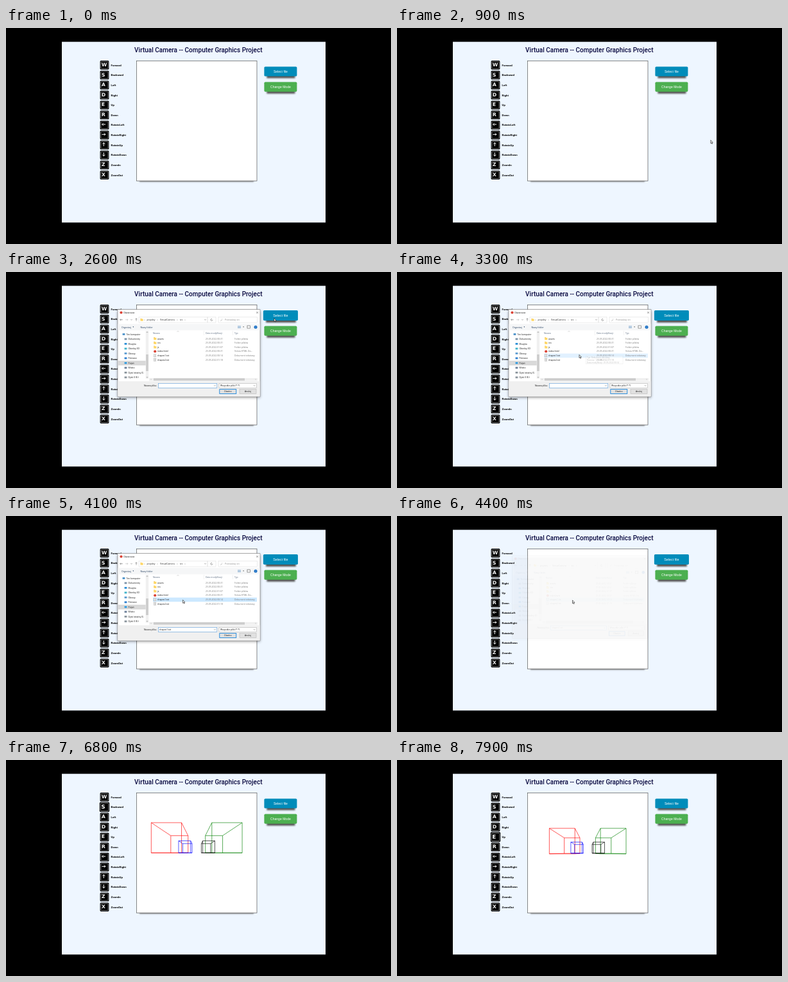
Recreate the animation shown at these times as an HTML page with a canvas. Size 600x338 px, loop 8000 ms.

```html
<!DOCTYPE html>
<html lang="en">
<head>
<meta charset="utf-8">
<title>Virtual Camera</title>
<style>
html, body { margin: 0; width: 100%; height: 100%; overflow: hidden; background: #000; }
canvas { display: block; width: 600px; height: 338px; }
</style>
</head>
<body>
<canvas id="stage"></canvas>
<script>
const LOOP = 8000, STEP = 100;
const canvas = document.getElementById('stage');
const dpr = window.devicePixelRatio || 1;
canvas.width = 600 * dpr;
canvas.height = 338 * dpr;
const ctx = canvas.getContext('2d');

const KEYS = [['W', 'Forward'], ['S', 'Backward'], ['A', 'Left'], ['D', 'Right'],
  ['E', 'Up'], ['R', 'Down'], ['left', 'RotateLeft'], ['right', 'RotateRight'],
  ['up', 'RotateUp'], ['down', 'RotateDown'], ['Z', 'ZoomIn'], ['X', 'ZoomOut']];
const TURN = { right: 0, down: 1, left: 2, up: 3 };
const UI = '3.4px "Open Sans", sans-serif';

function rect(x, y, w, h, fill, stroke, lw = 0.5) {
  if (fill) { ctx.fillStyle = fill; ctx.fillRect(x, y, w, h); }
  if (stroke) { ctx.strokeStyle = stroke; ctx.lineWidth = lw; ctx.strokeRect(x, y, w, h); }
}
function round(x, y, w, h, r) {
  ctx.beginPath();
  ctx.roundRect(x, y, w, h, r);
}
function text(s, x, y, font, color, align = 'left') {
  ctx.font = font;
  ctx.fillStyle = color;
  ctx.textAlign = align;
  ctx.fillText(s, x, y);
}
function line(points, color, lw) {
  ctx.beginPath();
  points.forEach(([x, y], i) => i ? ctx.lineTo(x, y) : ctx.moveTo(x, y));
  ctx.strokeStyle = color;
  ctx.lineWidth = lw;
  ctx.stroke();
}
function disc(x, y, r, color) {
  ctx.beginPath();
  ctx.arc(x, y, r, 0, 7);
  ctx.fillStyle = color;
  ctx.fill();
}
function around(x, y, scale, draw) {
  ctx.save();
  ctx.translate(x, y);
  ctx.scale(scale, scale);
  draw();
  ctx.restore();
}
function blurred(x, y, w, h, blur, color) {
  ctx.save();
  ctx.filter = `blur(${blur * dpr}px)`;
  rect(x, y, w, h, color);
  ctx.restore();
}
const clamp = v => Math.max(0, Math.min(1, v));

// Piecewise linear track of [time, ...values]
function track(stops, t) {
  if (t <= stops[0][0]) return stops[0].slice(1);
  for (let i = 1; i < stops.length; i++) {
    const a = stops[i - 1], b = stops[i];
    if (t <= b[0]) {
      const k = (t - a[0]) / (b[0] - a[0]);
      return a.slice(1).map((v, j) => v + (b[j + 1] - v) * k);
    }
  }
  return stops[stops.length - 1].slice(1);
}

function drawKey(i, pressed) {
  const [sym, label] = KEYS[i], y = 58 + 15.64 * i;
  around(153.5, y, pressed ? 1.12 : 1, () => {
    round(-6.9, -6.9, 13.8, 13.8, 1.6);
    ctx.fillStyle = '#000';
    ctx.fill();
    round(-5.6, -5.6, 11.2, 11.2, 1.3);
    ctx.strokeStyle = '#d8d8d8';
    ctx.lineWidth = 0.5;
    ctx.stroke();
    if (sym in TURN) {
      ctx.translate(-1.2, -1);
      ctx.rotate(TURN[sym] * Math.PI / 2);
      line([[-2.8, 0], [2.6, 0]], '#fff', 1);
      line([[0.6, -2], [2.6, 0], [0.6, 2]], '#fff', 1);
    } else {
      text(sym, -4.5, 1.9, 'bold 7.5px "DejaVu Sans", sans-serif', '#fff');
    }
  });
  text(label, 163.6, y + 1.6, 'bold 4.4px Roboto, sans-serif', '#000');
}

function drawButton(label, y, color, hover) {
  around(427.9, y, hover ? 1.06 : 1, () => {
    blurred(-21.5, 3, 44, 7.5, 1.1, '#555');
    round(-25.5, -7.6, 51, 15.2, 1.7);
    ctx.fillStyle = color;
    ctx.fill();
    text(label, 0, 1.7, '5.07px "Liberation Sans", Arial, sans-serif', '#fff', 'center');
  });
}

function drawPage(t) {
  rect(0, 0, 600, 338, '#000');
  rect(87, 21.6, 411, 282.8, '#eef6ff');
  text('Virtual Camera -- Computer Graphics Project', 299.8, 38,
    '500 10px Roboto, sans-serif', '#08083f', 'center');
  KEYS.forEach((k, i) => drawKey(i,
    (i === 1 && t >= 6100 && t < 7400) || (i === 4 && t >= 7500)));
  blurred(208, 236, 178, 4.6, 0.9, '#777');
  rect(203.4, 51.4, 187.6, 187.8, '#fff', '#555', 0.7);
  drawButton('Select file', 68, '#008cba', t >= 1700 && t < 4700);
  drawButton('Change Mode', 92.2, '#4caf50', false);
}

// Wireframe cubes seen by a pinhole camera
function drawCube(side, near, color, back, rise) {
  const at = (x, y, z) => {
    const f = 62.6 / (z + back);
    return [297.2 + side * x * f, 145.3 - (y - rise) * f];
  };
  const face = z => [at(3, 0, z), at(1, 0, z), at(1, 2, z), at(3, 2, z)];
  const a = face(near), b = face(near + 2);
  line([...a, a[0]], color, 0.65);
  line([...b, b[0]], color, 0.65);
  a.forEach((p, i) => line([p, b[i]], color, 0.65));
}
function drawScene(t) {
  const [back] = track([[6000, 0], [6800, 0.65], [7400, 1.14]], t);
  const [rise] = track([[7400, 0], [7900, 0.075]], t);
  drawCube(-1, 2, '#f00', back, rise);
  drawCube(1, 2, '#008000', back, rise);
  drawCube(-1, 6, '#00f', back, rise);
  drawCube(1, 6, '#000', back, rise);
}

function folder(x, y) {
  rect(x - 2, y - 2, 2, 1, '#e9b73c');
  rect(x - 2, y - 1.4, 4.2, 3.3, '#ffd766');
}
function chevron(x, y, dir = 1, color = '#555') {
  line([[x - 1.2, y - 0.6 * dir], [x, y + 0.6 * dir], [x + 1.2, y - 0.6 * dir]], color, 0.5);
}
function arrow(x, y, turn, color) {
  ctx.save();
  ctx.translate(x, y);
  ctx.rotate(turn * Math.PI / 2);
  line([[-2, 0], [2, 0]], color, 0.5);
  line([[0.6, -1.4], [2, 0], [0.6, 1.4]], color, 0.5);
  ctx.restore();
}

function drawSidebar() {
  const items = ['Ten komputer', 'Dokumenty', 'Muzyka', 'Obiekty 3D', 'Obrazy', 'Pobrane',
    'Pulpit', 'Wideo', 'Dysk lokalny (C:', 'Dysk X (E:)'];
  const tints = ['#4a90c8', '#7d93a8', '#2b8fd6', '#3fb3c9', '#5b9bd0', '#2f7fd0',
    '#2f9be0', '#6c7f99', '#8a949c', '#8a949c'];
  items.forEach((s, i) => {
    const y = 97.5 + 7.5 * i, x = i ? 186.5 : 183.5;
    if (i === 6) rect(174.4, y - 3.7, 43.4, 7.4, '#d9d9d9');
    rect(x - 1.9, y - 1.5, 3.8, 2.8, tints[i]);
    text(s, x + 4, y + 1.2, UI, '#111');
  });
  rect(217.8, 92, 4.4, 75, '#f0f0f0');
  rect(218.1, 129, 3.8, 26, '#cdcdcd');
  chevron(220, 94.3, -1);
  chevron(220, 164.7);
}

function drawFiles(t) {
  chevron(268, 93, -1, '#999');
  [['Nazwa', 229], ['Data modyfikacji', 311], ['Typ', 356]]
    .forEach(([s, x]) => text(s, x, 96.8, UI, '#5b6b80'));
  [308.5, 353.5].forEach(x => line([[x, 92], [x, 99]], '#e5e5e5', 0.5));
  const rows = [['assets', '00:31', 0], ['css', '00:31', 0], ['js', '01:07', 0],
    ['index.html', '00:31', 1], ['shapes1.txt', '00:14', 2], ['shapes2.txt', '01:18', 2]];
  const kinds = ['Folder plików', 'Velora HTML Do...', 'Dokument tekstowy'];
  rows.forEach(([name, time, kind], i) => {
    const y = 104.3 + 6.65 * i;
    if (i === 4 && t >= 3100) {
      rect(229, y - 3.3, 162, 6.6, t >= 4000 ? '#cce8ff' : '#e1f1ff');
    }
    if (kind === 0) folder(232.2, y);
    else if (kind === 1) disc(232.2, y, 2.1, '#db4437');
    else {
      rect(230.6, y - 2.1, 3.2, 4.2, '#fff', '#8a8a8a', 0.4);
      for (let k = -1; k < 2; k++) line([[231.2, y + k], [233.2, y + k]], '#8a8a8a', 0.3);
    }
    text(name, 236, y + 1.2, UI, '#111');
    text('25.05.2022 ' + time, 311, y + 1.2, UI, '#777');
    text(kinds[kind], 356, y + 1.2, UI, '#777');
  });
  rect(223, 166, 169, 4.4, '#f0f0f0');
  rect(230, 166.3, 142, 3.8, '#cdcdcd');
  text('‹', 226, 169.4, UI, '#555', 'center');
  text('›', 389, 169.4, UI, '#555', 'center');
}

function drawDialog(t) {
  blurred(174, 61, 222, 135.5, 2.2, 'rgba(0,0,0,.4)');
  rect(174, 58.7, 222, 136.3, '#fff', '#777', 0.6);
  disc(179.5, 63.5, 2.1, '#db4437');
  text('Otwieranie', 183.2, 64.8, UI, '#111');
  line([[390.2, 62.2], [392.8, 64.8]], '#333', 0.5);
  line([[392.8, 62.2], [390.2, 64.8]], '#333', 0.5);

  arrow(179.8, 74.7, 2, '#444');
  arrow(188, 74.7, 0, '#aaa');
  chevron(195.5, 74.7);
  arrow(203, 74.7, 3, '#444');
  rect(207, 70.5, 107, 8.6, '#fff', '#d9d9d9');
  folder(211.5, 74.8);
  [['›', 215.5], ['projekty', 219.5], ['›', 235.6], ['VirtualCamera', 240],
    ['›', 266.5], ['src', 271], ['›', 278.5]].forEach(([s, x]) => text(s, x, 76, UI, '#222'));
  chevron(310.5, 74.7);
  rect(314, 70.5, 13, 8.6, null, '#d9d9d9');
  ctx.beginPath();
  ctx.arc(320.5, 74.8, 1.5, 0, 5.2);
  ctx.strokeStyle = '#444';
  ctx.stroke();
  rect(331, 70.5, 60.5, 8.6, '#fff', '#d9d9d9');
  ctx.beginPath();
  ctx.arc(336.6, 74.3, 1.2, 0, 7);
  ctx.stroke();
  line([[335.7, 75.3], [334.6, 76.5]], '#444', 0.5);
  text('Przeszukaj: src', 341, 76, UI, '#888');

  rect(174.4, 81.3, 221.2, 10, '#f5f6f7');
  text('Organizuj', 180, 87.6, UI, '#1e395b');
  text('▾', 197.4, 87.4, UI, '#1e395b');
  text('Nowy folder', 209.5, 87.6, UI, '#1e395b');
  for (let k = 0; k < 3; k++) line([[361, 84.8 + k * 1.3], [366, 84.8 + k * 1.3]], '#5b8fc0', 0.6);
  text('▾', 369.3, 87.4, UI, '#444');
  rect(376, 84, 4.6, 4, '#fff', '#555', 0.6);
  disc(389, 86.2, 2.5, '#1a6fc4');
  text('?', 389, 87.5, UI, '#fff', 'center');

  drawSidebar();
  drawFiles(t);

  rect(174.4, 171, 221.2, 23.7, '#f0f0f0');
  text('Nazwa pliku:', 235, 179, UI, '#111', 'right');
  rect(237.3, 174.3, 91.5, 7, '#fff', '#5a9bd8', 0.6);
  chevron(325.5, 177.8);
  if (t >= 4000) text('shapes1.txt', 239, 179, UI, '#111');
  rect(332, 174.3, 58.5, 7, '#fff', '#a8a8a8');
  text('Wszystkie pliki (*.*)', 334, 179, UI, '#111');
  chevron(387, 177.8);
  rect(332.8, 183.6, 26, 6.8, '#e1e1e1', '#0078d7', 0.8);
  text('Otwórz', 345.8, 188.3, UI, '#111', 'center');
  rect(364, 183.6, 26, 6.8, '#e1e1e1', '#adadad');
  text('Anuluj', 377, 188.3, UI, '#111', 'center');
}

function drawTip(t) {
  const alpha = track([[3200, 0], [3300, 0.4], [3400, 1], [3900, 1], [4000, 0]], t)[0];
  if (!alpha) return;
  ctx.globalAlpha = alpha;
  rect(294.5, 131.5, 57.5, 12.4, '#fff', '#bbb', 0.4);
  ['Typ: Dokument tekstowy', 'Rozmiar: 1,12 KB', 'Data modyfikacji: 25.05.2022 00:14']
    .forEach((s, i) => text(s, 296, 134.9 + i * 3.9, '3.1px "Open Sans", sans-serif', '#666'));
  ctx.globalAlpha = 1;
}

function drawCursor(t) {
  if (t < 100 || t >= 5000) return;
  const [x, y] = track([[100, 488, 300], [1000, 489, 160], [1700, 440, 64], [2500, 440, 63],
    [3200, 284, 129.5], [3700, 284, 129.5], [4200, 273.5, 131.8]], t);
  const tip = [[0, 0], [0, 5], [1.1, 4], [2, 5.8], [2.7, 5.4], [1.9, 3.7], [3.4, 3.6]];
  ctx.beginPath();
  tip.forEach(([a, b]) => ctx.lineTo(x + a, y + b));
  ctx.closePath();
  ctx.fillStyle = '#fff';
  ctx.fill();
  ctx.strokeStyle = '#111';
  ctx.lineWidth = 0.6;
  ctx.stroke();
}

function draw(now) {
  const t = Math.floor((now % LOOP) / STEP) * STEP;
  ctx.setTransform(dpr, 0, 0, dpr, 0, 0);
  drawPage(t);
  if (t >= 4600) drawScene(t);
  const [alpha, scale] = track([[2200, 0, 0.92], [2400, 1, 1], [4200, 1, 1],
    [4300, 0.3, 0.97], [4400, 0.07, 0.95], [4500, 0.03, 0.95], [4600, 0, 0.95]], t);
  if (alpha > 0) {
    ctx.globalAlpha = clamp(alpha);
    around(285, 127, scale, () => {
      ctx.translate(-285, -127);
      drawDialog(t);
    });
    ctx.globalAlpha = 1;
    drawTip(t);
  }
  drawCursor(t);
  requestAnimationFrame(draw);
}
requestAnimationFrame(draw);
</script>
</body>
</html>
```
